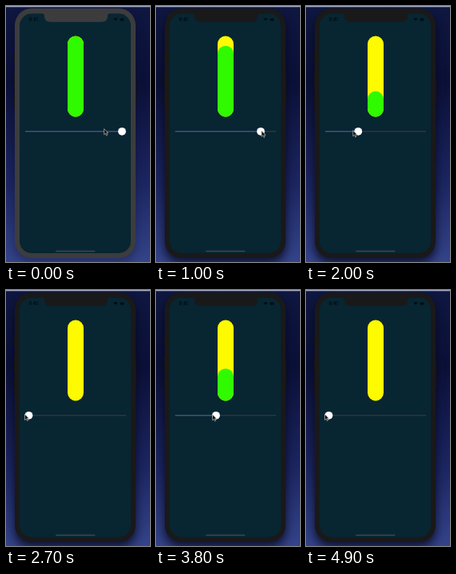
Write an HTML page that moves like this. It is 180 px wide and 320 px high and loops after 5 s.

```html
<!DOCTYPE html>
<html lang="en">
<head>
<meta charset="utf-8">
<title>Slider gauge</title>
<style>
  html, body { margin: 0; width: 100%; height: 100%; overflow: hidden; background: #0b1036; }
  svg { display: block; width: 100vw; height: 100vh; }
  text { font: 700 5.5px Inter, Arial, sans-serif; }
  .body { fill: #3c3c3d; }
  .shade { opacity: .3; filter: blur(6px); }
  .active .body { fill: #19191a; }
  .active .shade { opacity: .75; }
</style>
</head>
<body>
<svg id="stage" viewBox="0 0 180 320">
  <defs>
    <linearGradient id="sky" x1="0" y1="0" x2="0" y2="1">
      <stop offset="0" stop-color="#0f1740"/>
      <stop offset=".3" stop-color="#0b1038"/>
      <stop offset=".7" stop-color="#1c2662"/>
      <stop offset="1" stop-color="#34448a"/>
    </linearGradient>
    <clipPath id="tube"><rect x="77" y="37.5" width="20" height="101" rx="10"/></clipPath>
  </defs>

  <rect width="180" height="320" fill="url(#sky)"/>
  <rect class="shade" x="10" y="10" width="153" height="312" rx="21" fill="#04061a"/>
  <rect width="180" height="1.3" fill="#a9b0ca"/>

  <path d="M10 60h2v10h-2zM10 83h2v20h-2zM10 110h2v18h-2zM161 89h2v34h-2z" fill="#131316"/>
  <rect class="body" x="11" y="3" width="151" height="312" rx="21"/>
  <rect x="17" y="9.5" width="139" height="299.5" rx="15" fill="#082532"/>
  <path class="body" d="M44 9h87q-4 0-4 4 0 7-8 7H56q-8 0-8-7 0-4-4-4z"/>
  <g fill="#030c12">
    <text x="28.5" y="19.4">9:41</text>
    <path d="M134.5 16q2.5-2 5 0l-2.5 2.5z"/>
    <rect x="142.5" y="15.5" width="5" height="3" rx="1"/>
  </g>
  <rect x="62" y="305.8" width="49.5" height="1.5" rx=".75" fill="#3f474c"/>

  <g clip-path="url(#tube)">
    <rect x="76" y="37" width="22" height="102" fill="#fefa00"/>
    <rect id="level" x="77" width="20" height="130" rx="10" fill="#30fa00"/>
  </g>

  <path d="M24 156.8H150" stroke="#4b3943"/>
  <path id="track" stroke="#486384"/>
  <circle id="knob" cy="156.8" r="4.9" fill="#fff"/>
  <path id="pointer" d="M0 0V7.2L1.7 5.7 2.9 8.3 4.1 7.8 3 5.2H5.2Z"
        fill="#111" stroke="#d5d5d5" stroke-width=".6" stroke-linejoin="round"/>
</svg>
<script>
const LOOP = 5000, STEP = 100, CLICK = 700, LEAD = 50;
const MIN = 28.5, MAX = 145, BOTTOM = 138.5, HEIGHT = 101;

// Turning points of the drag: time, knob x, pointer offset from the knob
const turns = [
  [0, MAX, -27], [500, MAX, 4.5], [650, MAX, 4.5],
  [1200, 127, 2], [1350, 127, 2], [2700, MIN, -5],
  [2850, MIN, -5], [3500, 113, 8], [3800, 75, -1], [4900, MIN, -5]
];

const el = id => document.getElementById(id);
const set = (id, name, value) => el(id).setAttribute(name, value);
const mix = (a, b, u) => a + (b - a) * u;

// Strokes to the left slow down; strokes to the right run almost evenly
function pose(t) {
  const i = Math.max(1, turns.findIndex(k => k[0] > t));
  const [a, b] = t < turns.at(-1)[0] ? [turns[i - 1], turns[i]] : [turns.at(-1), [LOOP, MIN, -5]];
  const u = (t - a[0]) / (b[0] - a[0]);
  const eased = 1 - (1 - u) ** (b[1] > a[1] ? .9 : 1.5);
  return { x: mix(a[1], b[1], eased), dx: mix(a[2], b[2], eased) };
}

function draw(t) {
  const { x } = pose(t);
  const hand = pose(t + LEAD);
  set("knob", "cx", x);
  set("track", "d", `M24 156.8H${x}`);
  set("level", "y", BOTTOM - (x - MIN) / (MAX - MIN) * HEIGHT);
  set("pointer", "transform", `translate(${hand.x + hand.dx} ${155.8 + hand.dx * .1})`);
  el("stage").classList.toggle("active", t >= CLICK);
}

const start = performance.now();
function tick() {
  const t = (performance.now() - start) % LOOP;
  draw(Math.floor(t / STEP) * STEP);
  requestAnimationFrame(tick);
}
tick();
</script>
</body>
</html>
```
